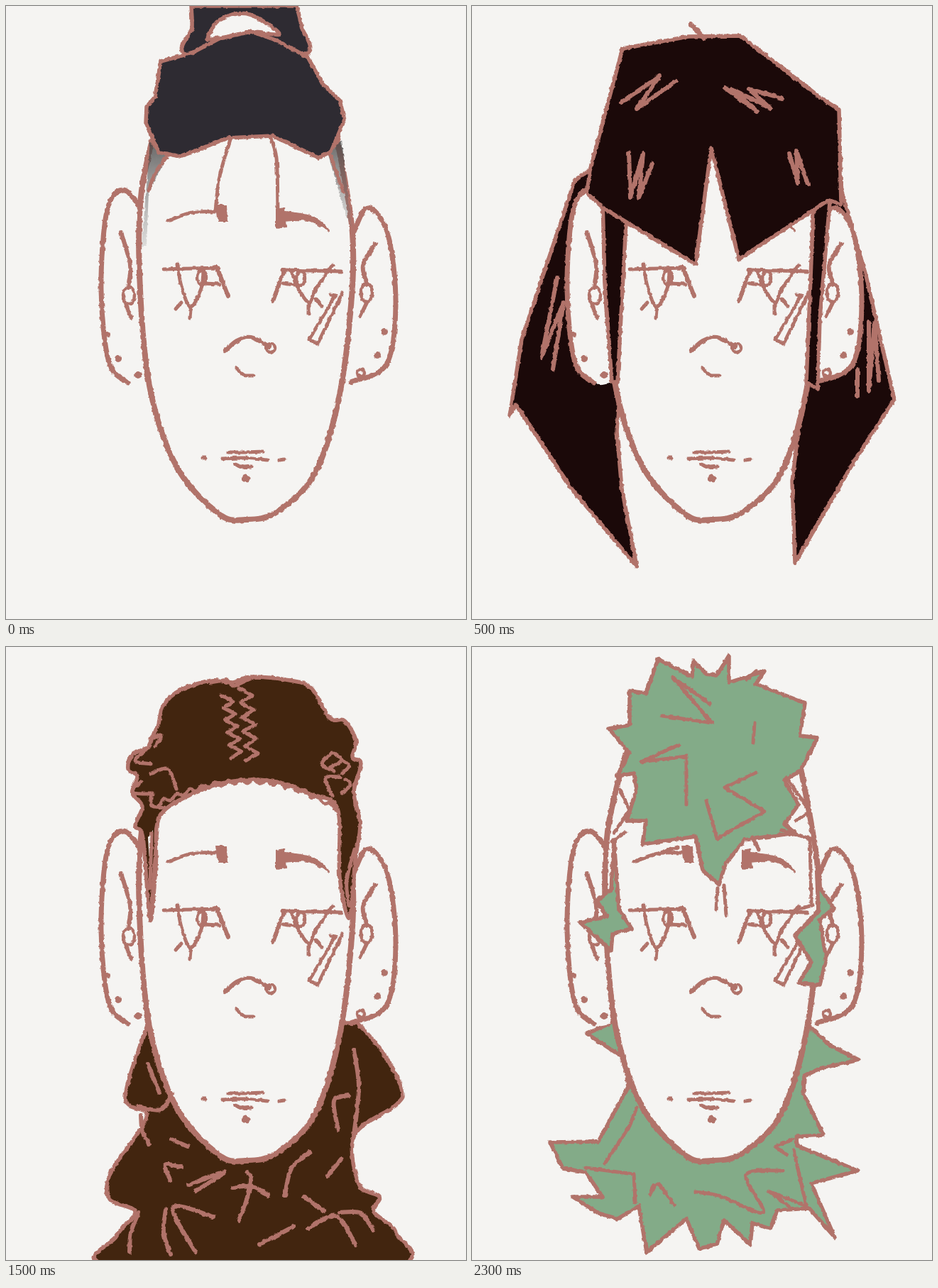
An HTML page for the animation above (2.5 s loop, 648 px wide and 864 px high).

```html
<!DOCTYPE html>
<html lang="en">
<head>
<meta charset="utf-8">
<title>Five hairstyles</title>
<style>
html, body { margin: 0; width: 100%; height: 100%; overflow: hidden; background: #f5f4f2; }
svg { display: block; width: 100vw; height: 100vh; }
path { stroke-linecap: round; stroke-linejoin: round; }
</style>
</head>
<body>
<svg viewBox="0 0 648 864">
  <defs>
    <filter id="chalk" x="0" y="0" width="648" height="864" filterUnits="userSpaceOnUse" color-interpolation-filters="sRGB">
      <feTurbulence type="fractalNoise" baseFrequency="0.16" numOctaves="2" seed="4"/>
      <feDisplacementMap in="SourceGraphic" scale="4" xChannelSelector="R" yChannelSelector="G"/>
    </filter>
    <linearGradient id="shade" x2="0" y2="1">
      <stop stop-color="#444" stop-opacity=".8"/>
      <stop offset="1" stop-color="#777" stop-opacity=".2"/>
    </linearGradient>
  </defs>
  <g id="art" filter="url(#chalk)"></g>
</svg>
<script>
const NS = 'http://www.w3.org/2000/svg';
const INK = '#b1736a', PAPER = '#f5f4f2', STEP = 500;
const art = document.getElementById('art');

function add(parent, tag, attrs) {
  const el = document.createElementNS(NS, tag);
  for (const k in attrs) el.setAttribute(k, attrs[k]);
  return parent.appendChild(el);
}

// "x y x y" is a polyline; a leading ~ makes it a smooth curve.
function toPath(s) {
  const n = s.match(/[\d.]+/g).map(Number), p = [];
  for (let i = 0; i < n.length; i += 2) p.push([n[i], n[i + 1]]);
  if (s[0] !== '~') return 'M' + p.join('L');
  let d = 'M' + p[0];
  for (let i = 0; i < p.length - 1; i++) {
    const a = p[i - 1] || p[i], b = p[i], c = p[i + 1], e = p[i + 2] || c;
    const c1 = [0, 1].map(k => b[k] + (c[k] - a[k]) / 6);
    const c2 = [0, 1].map(k => c[k] - (e[k] - b[k]) / 6);
    d += 'C' + [c1, c2, c];
  }
  return d;
}

const fill = (g, color, ...shapes) =>
  shapes.forEach(s => add(g, 'path', { d: toPath(s) + 'Z', fill: color }));
const ink = (g, width, ...strokes) =>
  strokes.forEach(s => add(g, 'path', { d: toPath(s), fill: 'none', stroke: INK, 'stroke-width': width }));
const shape = (g, color, ...shapes) =>
  shapes.forEach(s => add(g, 'path', { d: toPath(s) + 'Z', fill: color, stroke: INK, 'stroke-width': 5.5 }));
const ring = (g, x, y, rx, ry) =>
  add(g, 'ellipse', { cx: x, cy: y, rx, ry, fill: 'none', stroke: INK, 'stroke-width': 4.5 });
const dot = (g, x, y, r = 5) => add(g, 'circle', { cx: x, cy: y, r, fill: INK });

// Zigzag of n steps running down from (x, y).
function zig(x, y, dx, dy, amp, n) {
  const p = [];
  for (let i = 0; i <= n; i++) p.push(x + dx * i / n + (i % 2 ? amp : -amp), y + dy * i / n);
  return p.join(' ');
}

// Ragged arch of the curly hairline.
function hairline() {
  const p = [];
  for (let x = 205, i = 0; x <= 466; x += 9, i++) {
    const bend = x < 345 ? 0.0019 : 0.0027;
    p.push(x, 189 + bend * (x - 345) ** 2 + (i % 2 ? 3 : -3));
  }
  return '~' + p.join(' ');
}

const layers = () => Array.from({ length: 5 }, () => add(art, 'g', { display: 'none' }));
const back = layers(), face = add(art, 'g', {}), front = layers();

function drawHead(g) {
  const left = '~190 285 165 259 142 290 134 400 145 502 172 531';
  const right = '~490 318 510 284 538 322 549 420 536 505 486 530';
  const head = '~222 130 191 260 189 400 204 545 242 652 300 716 337 724 380 714 432 664 464 575 483 455 488 320 462 165';
  fill(g, PAPER, left + ' 195 531', right, head);
  ink(g, 7, left, right);
  ink(g, 8, head);
  ink(g, 6, '~162 319 175 365 172 396', '~167 416 176 439', '~520 335 503 366 509 392', '~508 418 499 437');
  ring(g, 173, 408, 8, 12);
  ring(g, 508, 404, 8, 13);
  ring(g, 500, 517, 5, 5);
  dot(g, 144, 463, 4);
  dot(g, 158, 497);
  dot(g, 186, 520);
  dot(g, 533, 459);
  dot(g, 523, 492);
}

function drawEyes(g) {
  ink(g, 5, '223 371 300 369', '~242 364 247 395 260 424 275 398 278 375', '278 391 300 392', '247 418 239 427', '260 428 259 440');
  ink(g, 5, '390 372 472 374', '~403 376 411 397 427 418 437 398 460 365', '391 391 406 393', '426 420 426 434', '436 413 445 423');
  ink(g, 6, '297 368 313 409', '392 372 376 416');
  ink(g, 5, '474 404 439 476 427 470 464 408 457 407');
  ring(g, 276, 383, 6, 10);
  ring(g, 415, 384, 6, 10);
}

function drawFeatures(g) {
  ink(g, 6, '~309 486 325 472 345 467 371 480');
  ring(g, 373, 482, 6, 6);
  ink(g, 5, '~325 510 334 520 348 521', '~313 629 335 629 362 628', '~304 638 335 637 368 640', '~323 646 334 650 346 649');
  ink(g, 5, '277 637 281 637', '385 640 392 639', '~228 303 262 291 296 290');
  dot(g, 338, 666, 5.5);
  fill(g, INK, '295 280 311 280 312 304 299 304', '380 286 392 284 395 312 380 314', '~388 288 435 297 456 318 425 303 390 304');
}

function drawBun(g) {
  const dark = '#2e2b32';
  fill(g, 'url(#shade)', '203 192 228 211 201 262 198 338 191 338', '453 206 473 190 487 312 477 290');
  ink(g, 5, '~226 213 209 238 201 260', '457 210 475 262', '~316 188 301 240 295 288', '~372 184 381 215 383 292');
  shape(g, dark, '~261 0 262 30 258 70 417 70 416 28 409 0');
  shape(g, PAPER, '~283 47 300 20 340 11 385 39 345 37 310 44');
  shape(g, dark, '218 78 262 66 300 46 345 36 380 48 425 72 446 110 470 133 477 160 458 205 440 214 395 192 ' +
    '375 183 312 186 262 206 245 212 215 206 197 165 198 142 210 128');
}

function drawBob(b, f) {
  const dark = '#1b0909';
  shape(b, dark, '165 232 145 245 70 470 53 578 62 562 140 680 232 790 211 680 204 600 208 530 260 300',
    '520 258 555 380 595 555 541 637 455 785 451 670 466 550 420 300');
  shape(f, dark, '184 272 217 306 205 530 197 530 187 390', '481 285 505 265 490 440 487 540 471 530');
  shape(f, dark, '212 60 305 43 378 42 492 130 517 146 520 280 503 273 376 357 337 200 315 364 184 284 162 264 166 232');
}

function drawShine(g) {
  ink(g, 6, '308 25 327 46 314 30', '210 136 264 99 232 145 287 106', '356 115 402 149 366 117 420 144 390 117 437 130');
  ink(g, 6, '221 206 223 270 241 208 235 270 254 222', '447 208 459 250 457 204 473 251');
  ink(g, 6, '120 383 98 495 129 418 114 512', '543 512 543 550', '559 446 559 542 567 446 573 528');
}

function drawSpikes(g) {
  const tan = '#d4b49e';
  shape(g, tan, '284 20 330 52 336 20 337 52 386 30 388 65 461 92 468 150 523 168 512 230 545 228 520 243 522 262 ' +
    '480 290 462 290 458 238 443 242 438 222 404 250 402 218 335 203 349 275 302 192 248 230 246 200 ' +
    '215 240 212 275 165 299 186 284 180 240 135 243 180 236 142 190 178 178 175 135 217 110 210 65 260 42');
  shape(g, tan, '486 290 498 318 475 350', '489 338 500 346 489 362', '165 299 187 286 189 312');
  shape(g, tan, '206 600 203 572 166 579 196 533', '471 598 467 569 509 596 478 536');
}

function drawScarf(g) {
  shape(g, '#42250f', '~200 530 168 635 198 662 148 740 146 778 182 796 156 830 153 872 540 872 ' +
    '549 825 518 796 526 775 497 757 491 688 550 645 557 622 530 570 495 530');
}

function drawFolds(g) {
  ink(g, 6, '~186 648 218 652 234 630', '200 588 216 628', '~190 660 192 682 201 700', '~187 797 176 825 174 853');
  ink(g, 6, '~247 733 224 730 232 752', '~258 758 308 740 268 766', '~225 793 222 825 232 857', '~292 803 235 790 267 853', '233 694 256 704');
  ink(g, 6, '~320 762 345 760 370 773', '~340 740 345 752 338 782 328 808', '357 842 405 817', '~428 712 402 735 393 773', '472 722 453 745');
  ink(g, 6, '~420 775 448 795', '~425 820 465 802 492 842', '~470 797 500 798 517 822', '~490 568 497 620 490 688', '~482 632 462 640 468 680');
}

function drawCurls(g) {
  shape(g, '#42250f', '~215 108 222 82 245 61 290 47 320 50 345 42 400 47 430 58 456 100 477 104 493 132 488 155 500 165 ' +
    '490 205 499 250 492 300 484 382 470 325 467 228 430 208 390 192 345 187 300 193 260 208 216 240 ' +
    '211 310 203 385 193 270 182 252 192 225 178 205 185 182 172 172 178 152 200 142');
  fill(g, PAPER, '200 268 207 258 204 335');
  ink(g, 5, hairline(), zig(311, 68, 14, 88, 8, 10), zig(337, 58, 10, 102, 9, 10));
  ink(g, 5, '~205 178 228 172 240 200', '~190 190 178 205 207 207', '~204 210 206 225 223 226', '~203 130 219 124 210 140', '~200 143 182 160 204 165');
  ink(g, 5, '~462 175 445 165 460 150 472 160 456 170', '~470 183 450 185 460 210', '~478 186 485 195 473 205', '~475 160 483 168 474 178');
  ink(g, 5, '214 243 204 384', '~491 285 480 330 483 365', '205 262 203 340');
  ink(g, 5, '288 50 312 46 320 56 350 42');
}

function drawMane(g) {
  shape(g, '#83ab88', '200 528 162 545 215 580 220 620 178 697 110 698 128 735 160 740 184 775 142 775 178 798 ' +
    '205 806 235 788 246 853 302 806 320 848 345 842 355 808 392 842 395 812 420 820 430 794 ' +
    '475 791 511 832 478 756 543 738 458 703 457 690 495 688 467 630 468 605 490 594 545 582 505 562 475 534');
  fill(g, PAPER, '188 520 196 522 196 530');
}

function drawManeLines(g) {
  ink(g, 5, '232 649 222 675 187 728', '160 734 228 743 230 783', '~251 772 262 757 285 787');
  ink(g, 5, '~315 768 350 774 410 797 386 744 438 738', '452 694 427 704 444 716', '453 709 471 788 418 767 446 788');
}

function drawMohawk(g) {
  const green = '#83ab88';
  shape(g, green, '262 17 310 42 312 20 330 38 345 40 362 12 362 50 412 34 400 52 469 79 462 125 487 128 462 175 ' +
    '440 188 460 222 440 250 455 262 384 272 357 306 348 335 325 315 315 267 240 278 245 245 218 245 ' +
    '232 200 228 178 204 182 222 150 193 115 222 110 222 62 245 65');
  shape(g, green, '200 272 207 370 225 397 198 404 196 428 152 388 190 380 176 358 196 342',
    '485 300 489 338 510 368 490 384 499 440 490 476 460 474 478 444 455 407 488 372');
}

function drawMohawkLines(g) {
  ink(g, 5, '268 97 338 107 283 43 335 80', '398 107 396 135', '291 138 238 162 302 154 302 222');
  ink(g, 5, '400 177 356 198 412 232 345 270 330 217', '346 340 344 370', '355 336 358 378', '232 301 290 282');
  ink(g, 5, '208 200 222 230 200 262', '197 275 216 261', '443 184 476 232 456 245', '436 258 476 270 478 360');
  ink(g, 5, '395 268 404 286', '387 46 400 34', '457 370 480 364');
}

drawHead(face);
drawEyes(face);
drawFeatures(face);
drawBun(front[0]);
drawBob(back[1], front[1]);
drawShine(front[1]);
drawSpikes(front[2]);
drawScarf(back[3]);
drawFolds(front[3]);
drawCurls(front[3]);
drawMane(back[4]);
drawManeLines(front[4]);
drawMohawk(front[4]);
drawMohawkLines(front[4]);

let shown = -1;
function render(t) {
  const now = Math.floor(t / STEP) % 5;
  if (now === shown) return;
  for (const set of [back, front]) {
    set.forEach((g, i) => g.setAttribute('display', i === now ? 'inline' : 'none'));
  }
  shown = now;
}

const start = performance.now();
function tick() {
  render(performance.now() - start);
  requestAnimationFrame(tick);
}
tick();
</script>
</body>
</html>
```
